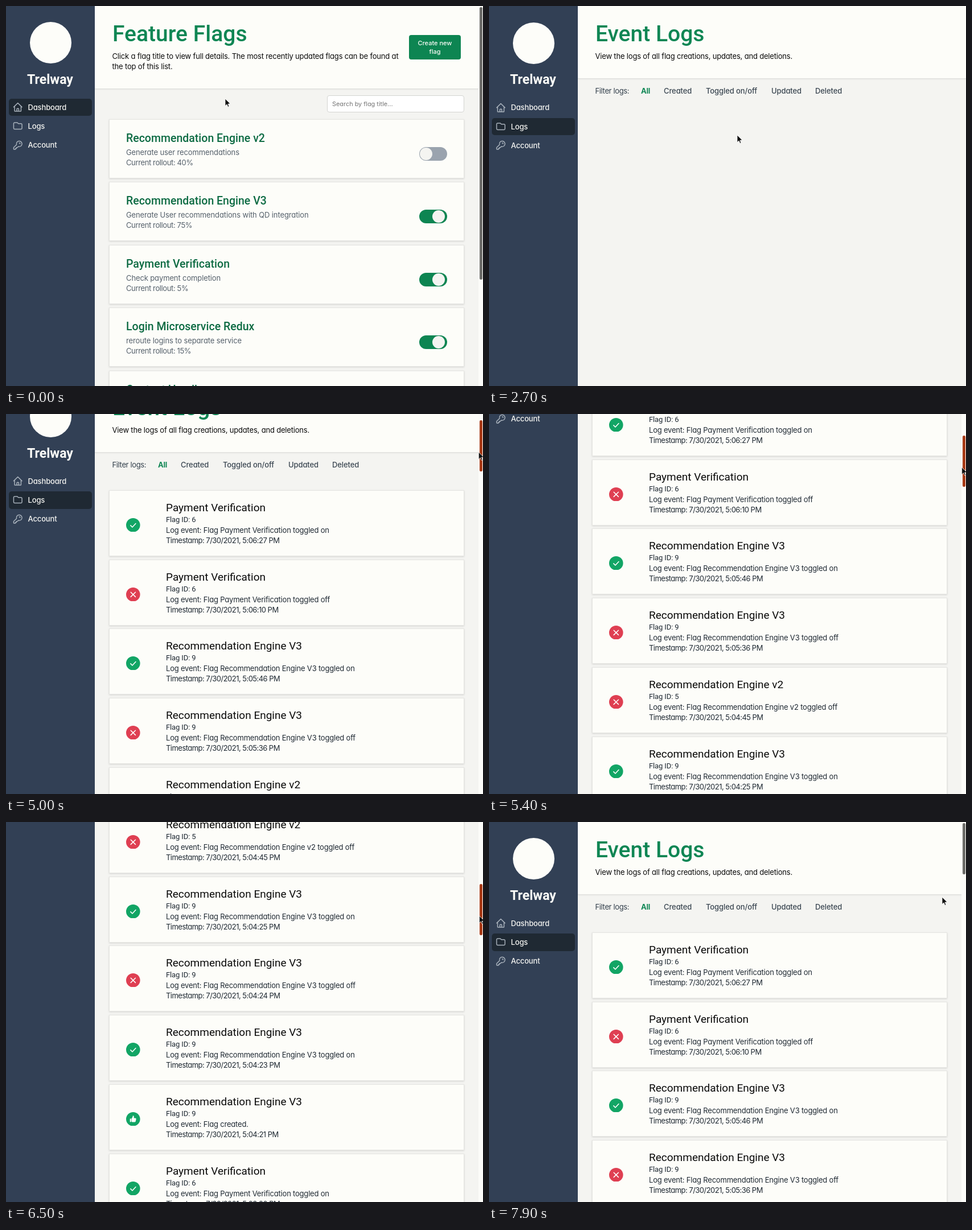
Write an HTML page that moves like this. It is 838 px wide and 668 px high and loops after 8 s.

```html
<!DOCTYPE html>
<html lang="en">
<head>
<meta charset="utf-8">
<title>Feature flags</title>
<style>
html, body { margin: 0; width: 100%; height: 100%; overflow: hidden; background: #f4f4f1; }
body { position: relative; font: 13px Inter, "Open Sans", sans-serif; font-feature-settings: "cv11"; color: #1f2933; }
div, i, svg { position: absolute; box-sizing: border-box; }
.t { line-height: 20px; white-space: nowrap; }
#side { left: 0; top: 0; width: 156px; height: 100%; background: #324055; }
#nav, .page { left: 0; top: 0; width: 100%; }
#logo { left: 42px; top: 28px; width: 73px; height: 73px; border-radius: 50%; background: #fdfdf9; }
.brand { left: 0; width: 155px; text-align: center; font: 700 23px/20px Roboto, sans-serif; color: #fdfdf9; }
.pill { left: 5px; width: 145.5px; height: 30.4px; border-radius: 5px; background: #1f2933; }
.link { font-weight: 500; letter-spacing: -.15px; color: #f4f4f1; }
.icon { left: 10.6px; width: 19.5px; height: 19.5px; fill: none; stroke: #a9b2bc; stroke-width: 1.8; stroke-linecap: round; stroke-linejoin: round; }
.head { left: 156px; right: 0; top: 0; background: #fdfdf9; border-bottom: 1px solid #dfe0dd; box-shadow: 0 1px 2px #0001; }
.h1 { font: 500 39px/20px Roboto, sans-serif; color: #0f8654; }
.lead { letter-spacing: -.18px; color: #0a0a0a; }
.button { left: 708px; top: 51px; width: 91px; height: 43px; border-radius: 4px; background: #0d8552; color: #fdfdf9; font: 500 11px/15px Inter, sans-serif; text-align: center; padding-top: 7px; }
.search { left: 564px; top: 157px; width: 241px; height: 30px; border: 1px solid #d3d4d1; border-radius: 4px; background: #fff; }
.hint { font-size: 10.9px; color: #757575; }
.card { left: 181px; width: 624px; background: #fdfdf9; border: 1px solid #e6e6e3; box-shadow: 0 1px 3px #0002; }
.name { font: 500 19.5px/20px Roboto, sans-serif; color: #0d6b43; }
.desc { letter-spacing: -.12px; color: #55606b; }
.roll { letter-spacing: -.38px; color: #55606b; }
.toggle { left: 726px; width: 48.5px; height: 24px; border-radius: 12px; background: #9aa3ae; }
.toggle i { left: 1px; top: 1px; width: 22px; height: 22px; border-radius: 50%; background: #f4f4f1; }
.toggle.on { background: #0d8552; }
.toggle.on i { left: 23px; }
.label { letter-spacing: -.35px; color: #323f4b; }
.filter { font-weight: 500; letter-spacing: -.1px; color: #3a4651; }
.all { font-weight: 700; letter-spacing: -.2px; color: #0f8654; }
.event { font: 400 19px/20px Roboto, sans-serif; color: #0a0a0a; }
.id { font: 13px/20px Roboto, sans-serif; letter-spacing: -.12px; }
.what { letter-spacing: -.2px; }
.when { letter-spacing: -.53px; }
.badge { left: 211.2px; width: 24.6px; height: 24.6px; }
#gutter { left: 830px; top: 0; width: 8px; height: 100%; background: #fbfbf8; }
#thumb { left: 2px; width: 4.5px; border-radius: 2.2px; }
#cursor { left: 0; top: 0; width: 12px; height: 17px; overflow: visible; }
</style>
</head>
<body>
<div id="side"></div>
<div id="nav"></div>
<div id="flags" class="page"></div>
<div id="logs" class="page"></div>
<div id="gutter"><div id="thumb"></div></div>
<svg id="cursor"><path d="M0 0V12.6L3 9.9 5 14.4 7 13.5 5.1 9.2 9 8.8Z" fill="#111" stroke="#fff" stroke-width=".8"/></svg>
<script>
const el = id => document.getElementById(id);
const text = (x, y, cls, s) => `<div class="t ${cls}" style="left:${x}px;top:${y - 10}px">${s}</div>`;
const box = (cls, y, h, s = '') => `<div class="${cls}" style="top:${y}px;height:${h}px">${s}</div>`;

// Sidebar
const links = [
  ['Dashboard', 'M3 12l2-2m0 0l7-7 7 7M5 10v10a1 1 0 001 1h3m10-11l2 2m-2-2v10a1 1 0 01-1 1h-3m-6 0a1 1 0 001-1v-4a1 1 0 011-1h2a1 1 0 011 1v4a1 1 0 001 1m-6 0h6'],
  ['Logs', 'M3 7v10a2 2 0 002 2h14a2 2 0 002-2V9a2 2 0 00-2-2h-6l-2-2H5a2 2 0 00-2 2z'],
  ['Account', 'M15 7a2 2 0 012 2m4 0a6 6 0 01-7.743 5.743L11 17H9v2H7v2H4a1 1 0 01-1-1v-2.586a1 1 0 01.293-.707l5.964-5.964A6 6 0 1121 9z']
];
el('nav').innerHTML = '<div id="logo"></div>' + text(0, 129.5, 'brand', 'Trelway') +
  '<div class="pill" id="hover"></div><div class="pill" id="active"></div>' +
  links.map(([s, d], i) => {
    const y = 177.8 + 33.2 * i;
    return `<svg class="icon" style="top:${y - 9.7}px" viewBox="0 0 24 24"><path d="${d}"/></svg>` + text(38.5, y, 'link', s);
  }).join('');
el('hover').style.cssText = 'top:196.3px;background:#28343f';

// Dashboard page
const flags = [
  ['Recommendation Engine v2', 'Generate user recommendations', 40, ''],
  ['Recommendation Engine V3', 'Generate User recommendations with QD integration', 75, 'on'],
  ['Payment Verification', 'Check payment completion', 5, 'on'],
  ['Login Microservice Redux', 'reroute logins to separate service', 15, 'on'],
  ['Content Handler', 'Process uploaded content', 20, 'on']
];
el('flags').innerHTML = box('head', 0, 146) + text(187, 48.5, 'h1', 'Feature Flags') +
  text(186.5, 88, 'lead', 'Click a flag title to view full details. The most recently updated flags can be found at') +
  text(186.5, 106, 'lead', 'the top of this list.') +
  '<div class="button">Create new<br>flag</div><div class="search"></div>' +
  text(573, 172, 'hint', 'Search by flag title...') +
  flags.map(([name, desc, pct, on], i) => {
    const y = Math.round(199 + 110.4 * i);
    return box('card', y, 104) + text(211, y + 33.5, 'name', name) + text(211, y + 58, 'desc', desc) +
      text(211, y + 76, 'roll', `Current rollout: ${pct}%`) + box('toggle ' + on, y + 49, 24, '<i></i>');
  }).join('');

// Logs page
const V3 = 'Recommendation Engine V3', V2 = 'Recommendation Engine v2', PV = 'Payment Verification';
const ids = { [V3]: 9, [V2]: 5, [PV]: 6 };
const events = [
  [PV, 'on', '06:27'], [PV, 'off', '06:10'], [V3, 'on', '05:46'], [V3, 'off', '05:36'], [V2, 'off', '04:45'],
  [V3, 'on', '04:25'], [V3, 'off', '04:24'], [V3, 'on', '04:23'], [V3, 'new', '04:21'], [PV, 'on', '03:20'], [PV, 'off', '03:12']
];
const line = d => `<path d="${d}" fill="none" stroke="#fff" stroke-width="1.5" stroke-linecap="round" stroke-linejoin="round"/>`;
const marks = {
  on: line('M7.7 12.6l3 3 5.8-6.3'),
  off: line('M8 8l8 8M16 8l-8 8'),
  new: '<path transform="translate(5.2 4.8) scale(.68)" fill="#fff" d="M2 10.5a1.5 1.5 0 113 0v6a1.5 1.5 0 01-3 0zM6 10.3v5.5a2 2 0 001.1 1.8A4 4 0 009 18h5.4a2 2 0 002-1.6l1.2-6A2 2 0 0015.6 8H12V4a2 2 0 00-2-2 1 1 0 00-1 1v.7a4 4 0 01-.8 2.4L6.8 7.9a4 4 0 00-.8 2.4z"/>'
};
const cards = events.map(([name, kind, time], i) => {
  const y = Math.round(193.8 + 121.75 * i);
  const what = kind == 'new' ? 'Flag created.' : `Flag ${name} toggled ${kind}`;
  return box('card', y, 116) +
    `<svg class="badge" style="top:${y + 48.7}px" viewBox="0 0 24 24"><circle cx="12" cy="12" r="12" fill="${kind == 'off' ? '#df3f52' : '#12a565'}"/>${marks[kind]}</svg>` +
    text(281, y + 30.5, 'event', name) + text(281, y + 52, 'id', 'Flag ID: ' + ids[name]) +
    text(281, y + 70.2, 'what', 'Log event: ' + what) + text(281, y + 88.3, 'when', `Timestamp: 7/30/2021, 5:${time} PM`);
}).join('');
const filters = [['Created', 307], ['Toggled on/off', 381], ['Updated', 496], ['Deleted', 573]];
el('logs').innerHTML = box('head', 0, 128) + text(187, 48.5, 'h1', 'Event Logs') +
  text(186.5, 88, 'lead', 'View the logs of all flag creations, updates, and deletions.') +
  text(186.5, 148.5, 'label', 'Filter logs:') + text(267, 148.5, 'all', 'All') +
  filters.map(([s, x]) => text(x, 148.5, 'filter', s)).join('') + `<div id="list">${cards}</div>`;

// Motion: [time, ...values], linear between points
const scrollKeys = [[4700, 0], [5000, 60], [5400, 236], [5600, 345], [6100, 627], [6300, 680], [6500, 707],
  [6800, 707], [7000, 600], [7300, 240], [7600, 0]];
const cursorKeys = [[800, 385, 163], [1600, 62, 205], [1800, 62, 207], [2100, 424, 232], [2500, 424, 232],
  [2700, 436, 227], [3000, 458, 228], [3100, 458, 228], [3200, 380, 420], [3300, 293, 395], [3400, 293, 395],
  [3500, 688, 196], [3700, 688, 196], [4100, 801, 69], [4600, 830, 58], [6500, 831.5, 58], [7700, 831.5, 58],
  [7800, 815, 90], [7900, 796, 132]];
function at(keys, t) {
  const n = keys.findIndex(k => k[0] > t);
  if (n < 1) return keys[n ? keys.length - 1 : 0].slice(1);
  const a = keys[n - 1], b = keys[n], p = (t - a[0]) / (b[0] - a[0]);
  return a.slice(1).map((v, i) => v + (b[i + 1] - v) * p);
}
const show = (id, on) => { el(id).style.display = on ? '' : 'none'; };

function draw(now) {
  const t = Math.floor(now % 8000 / 100) * 100;
  const onLogs = t >= 1800, loaded = t >= 2800, bar = !onLogs || loaded, drag = t >= 4700 && t < 7800;
  const [scroll] = at(scrollKeys, t), [x, y] = at(cursorKeys, t);
  const thumbY = scroll * .1513;
  show('flags', !onLogs);
  show('logs', onLogs);
  show('list', loaded);
  show('gutter', bar);
  show('hover', !onLogs && t >= 1600);
  el('active').style.top = (onLogs ? 196.3 : 163.1) + 'px';
  el('nav').style.top = (bar ? -Math.round(scroll) : .7) + 'px';
  el('logs').style.top = -Math.round(scroll) + 'px';
  const thumb = el('thumb').style;
  thumb.top = 2 + thumbY + 'px';
  thumb.height = (onLogs ? 90 : 479) + 'px';
  thumb.background = drag ? '#a83a16' : '#6c6c69';
  el('cursor').style.transform = `translate(${x}px,${y + (drag ? thumbY : 0)}px)`;
  requestAnimationFrame(draw);
}
draw(0);
</script>
</body>
</html>
```
